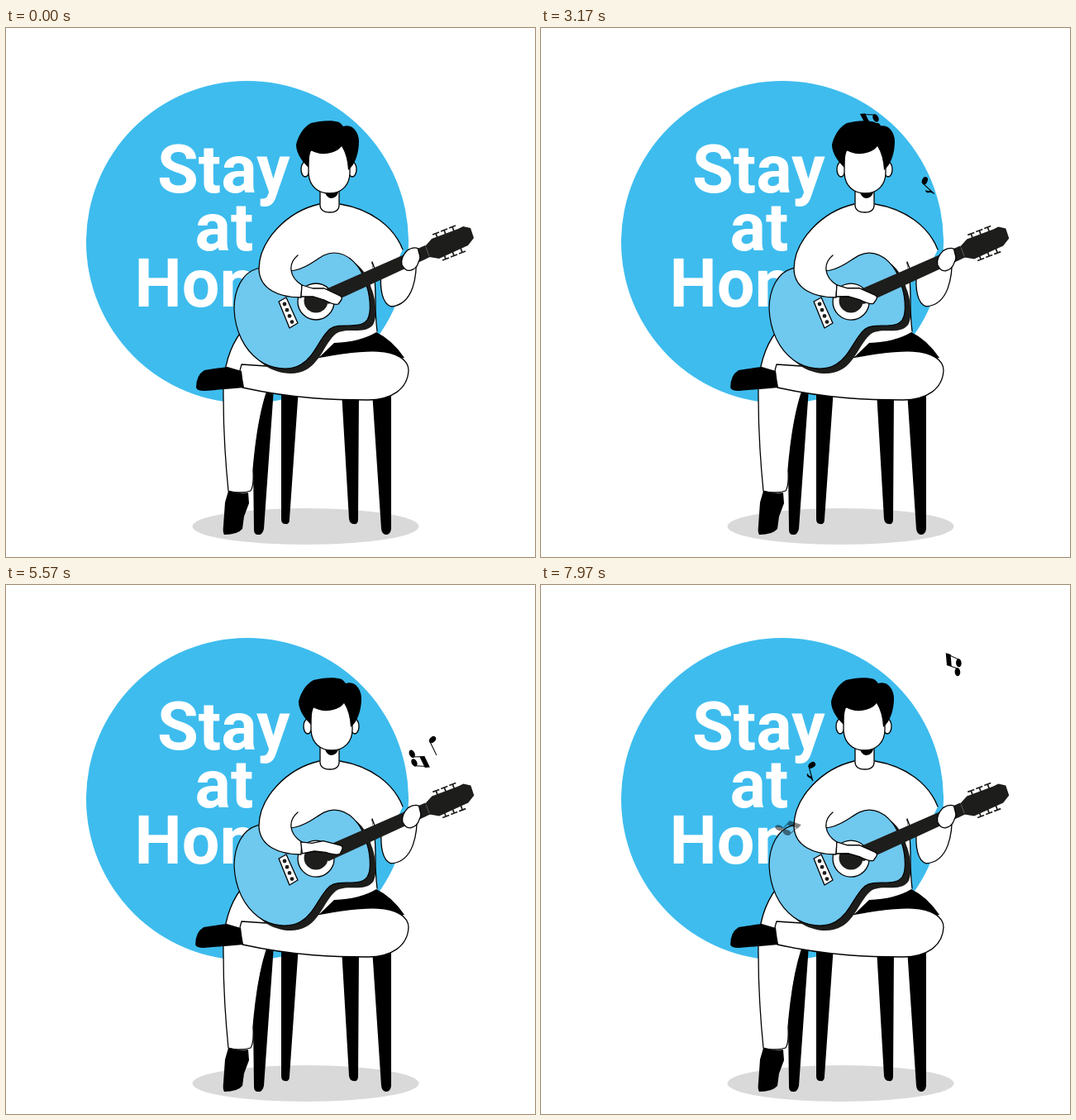
Write an HTML page that moves like this. It is 640 by 640 pixels and loops after 8000 ms.

```html
<!DOCTYPE html>
<html lang="en">
<head>
<meta charset="utf-8">
<title>Stay at Home</title>
<style>
  html, body { margin: 0; width: 100%; height: 100%; overflow: hidden; background: #fff; }
  svg { display: block; width: 100%; height: 100%; }
  text { font: 700 81px Roboto, sans-serif; fill: #fff; }
  .line { fill: #fff; stroke: #000; stroke-width: 1.3; stroke-linejoin: round; stroke-linecap: round; }
  .open { fill: none; }
  .cloth { fill: #fff; }
  .wood { fill: #1d1d1b; }
</style>
</head>
<body>
<svg viewBox="0 0 640 640">
  <defs>
    <path id="body" d="M304 291C286 296 276 316 276 340C277 366 288 389 306 402C320 412 342 416 357 407C374 397 379 375 392 364C405 355 427 366 437 353C443 344 440 320 435 309C430 288 414 272 397 272C380 272 372 288 350 293C335 297 318 287 304 291Z"/>
    <g id="pair">
      <ellipse cx="-8" cy="6" rx="5" ry="3.3" transform="rotate(-12 -8 6)"/>
      <ellipse cx="3" cy="6" rx="5" ry="3.3" transform="rotate(-12 3 6)"/>
      <path d="M-4 6L-1 -8M7 6L12 -10" stroke="#000"/>
      <path d="M-1 -8L13 -11L12 -5L-2 -2Z"/>
    </g>
    <g id="quarter">
      <ellipse cx="-2" cy="8" rx="4.7" ry="3.3" transform="rotate(-20 -2 8)"/>
      <path d="M2 8V-11" stroke="#000" stroke-width="1.1"/>
    </g>
    <g id="eighth">
      <use href="#quarter"/>
      <path d="M2 -11Q3 -7 6 -5Q8 -3 6 0Q5 -4 2 -5Z"/>
    </g>
  </defs>

  <ellipse cx="362.500" cy="603" rx="137" ry="22" fill="#d9d9d9"/>
  <circle cx="292" cy="259" r="195" fill="#3ebcee"/>
  <text x="183" y="198.500">Stay</text>
  <text x="228.500" y="268.500">at</text>
  <text x="155.500" y="336.500">Home</text>

  <path d="M310 436H324L312 606Q310 614 305 613Q300 613 300 607L299 530ZM333 436H354L343 594Q343 601 338 600Q333 600 333 594ZM406 440H427L426 594Q426 601 421 600Q416 600 415 594ZM443 440H466V606Q465 613 460 613Q455 613 454 606Z"/>
  <path class="line" d="M285 367C271 385 262 412 263 447C263 490 266 530 269 560Q283 564 296 560Q300 554 299 535C302 500 306 470 315 442L340 400Z"/>
  <path d="M269 560Q281 564 293 562L294 575L288 591L286 606Q280 613 264 613Q262 610 263 602L265 574Z"/>

  <path class="cloth" d="M379 213L404 213L440 240L443 284Q447 300 447 330L449 368L380 408L345 380L344 240Z"/>
  <path class="line open" d="M443 284Q447 300 447 330Q447 350 449 367"/>
  <path d="M370 407L397 381Q428 380 448 368Q467 377 482 399L430 410Z"/>
  <path class="line" d="M285 407L315 409C350 406 410 389 450 391C473 392 487 402 487 414C486 437 466 450 438 450C400 450 350 449 286 435Q280 420 285 407Z"/>
  <path id="foot" d="M288 435Q286 425 285 415L268 410Q252 412 240 414Q230 420 230 435Q231 439 240 439Q264 437 288 435Z"/>

  <path class="cloth" d="M404 213C441 219 469 240 480 268L465 300H445L443 283L392 260Z"/>
  <path class="line open" d="M404 213C441 219 469 240 480 268M443 283L446 291"/>
  <path id="forearm" class="line" d="M480 277L495 273C497 300 493 334 466 337C455 334 452 316 453 298L478 286"/>

  <g id="guitar">
    <use href="#body" x="7" y="6" class="wood"/>
    <use href="#body" fill="#6fc8ee" stroke="#000" stroke-width="1.2"/>
    <circle class="line" cx="375" cy="331" r="22"/>
    <circle class="wood" cx="375" cy="330" r="14.500"/>
    <path class="line" d="M330 331L339 326L353 357L343 363Z"/>
    <g class="wood" id="pins"></g>
    <path class="wood" d="M380 319L507 263L513 277L390 334Z"/>
    <path class="wood" d="M507 264L515 255L547 243L553 240L562 242L566 254L559 263L524 279L512 277Z"/>
    <path d="M508 265L512 276" stroke="#888" stroke-width=".6"/>
    <g id="pegs" stroke="#1d1d1b" stroke-width="1.800" fill="none"></g>
  </g>
  <path id="grip" class="line" d="M478 286Q476 278 484 269Q491 264 497 266L499 273Q501 277 498 283Q496 291 488 293Q482 294 478 286Z"/>

  <path class="cloth" d="M379 213C340 222 306 257 306 292C307 316 330 326 357 326L358 311C342 301 341 285 353 275L375 240L390 213Z"/>
  <path class="line open" d="M379 213C340 222 306 257 306 292C307 316 330 326 357 326L358 311C342 301 341 285 353 275"/>
  <path id="hand" class="line" d="M358 311L371 315L385 315L404 324Q408 326 405 330L402 334Q398 336 385 329L372 325L357 325Z"/>

  <path class="line" d="M380 194V212Q379 223 392 223Q404 223 403 212V194Z"/>
  <path d="M386 199H402Q400 206 393 206Q388 205 386 199Z"/>
  <g id="head">
    <ellipse class="line" cx="362" cy="171" rx="5" ry="9"/>
    <ellipse class="line" cx="419" cy="171" rx="5" ry="9"/>
    <path class="line" d="M366 150V176C367 192 378 200 391 200C406 200 416 190 416 175V145L391 135Z"/>
    <path d="M366 169C360 163 351 153 351 141C353 132 359 120 369 115C380 112 395 111 403 114Q406 116 408 119C419 115 427 126 427 137C427 150 423 165 414 172Q413 154 406 143C399 153 379 155 369 148Q366 157 366 169Z"/>
  </g>
  <g id="notes"></g>
</svg>
<script>
const LOOP = 8;
const $ = id => document.getElementById(id);
const add = (parent, name, attrs) => {
  const el = document.createElementNS('http://www.w3.org/2000/svg', name);
  for (const key in attrs) el.setAttribute(key, attrs[key]);
  return parent.appendChild(el);
};

for (let i = 0; i < 4; i++) add($('pins'), 'circle', { cx: 337 + 3 * i, cy: 334 + 7.2 * i, r: 2.4 });
for (let i = 0; i < 3; i++) {
  const x = 520 + 10 * i, y = 248.5 - 4 * i;
  add($('pegs'), 'path', { d: `M${x + 3} ${y + 8}L${x} ${y}m-4 1.500l8 -3` });
  add($('pegs'), 'path', { d: `M${x + 9} ${y + 23}l3 8m-4 1.500l8 -3` });
}

// x and y are the birth place; speeds are per second
const notes = [
  { shape: 'pair', born: 1.1, life: 3.2, x: 400, y: 246, vx: 0, vy: -64, angle: 14, spin: 116 },
  { shape: 'eighth', born: 1.72, life: 3.75, x: 470, y: 259, vx: -.8, vy: -46.5, angle: 11, spin: 84 },
  { shape: 'quarter', born: 3.5, life: 3.75, x: 523, y: 250, vx: -2.5, vy: -26.5, angle: -18, spin: 83 },
  { shape: 'pair', born: 4.55, life: 3.75, x: 499, y: 259, vx: 0, vy: -47.5, angle: -10, spin: 84 },
  { shape: 'eighth', born: 6.6, life: 3.2, x: 343, y: 307, vx: -11, vy: -59, angle: 32, spin: 97 },
  { shape: 'pair', born: 7.8, life: 3.2, x: 298, y: 303, vx: 0, vy: -60, angle: 12, spin: 110 }
];
for (const note of notes) note.el = add($('notes'), 'use', { href: '#' + note.shape });

const headSteps = [[0, 0], [1.93, 0], [3.17, 1], [4.67, 2], [5.57, 3], [6.73, 3.5], [7.97, 0], [8, 0]];
const clamp = v => Math.max(0, Math.min(1, v));
const wave = (t, period) => Math.sin(2 * Math.PI * t / period);
const swing = (t, period) => (1 - Math.cos(2 * Math.PI * t / period)) / 2;
const move = (id, value) => $(id).setAttribute('transform', value);

function track(steps, t) {
  const i = steps.findIndex(step => step[0] > t);
  const [t0, a] = steps[i - 1], [t1, b] = steps[i];
  return a + (b - a) * (t - t0) / (t1 - t0);
}

function draw(t) {
  const reach = `rotate(${1 + wave(t, .6)} 467 337)`;
  move('head', `translate(${track(headSteps, t)} 0)`);
  move('hand', `rotate(${-12 * swing(t, .32)} 357 318)`);
  move('foot', `translate(${-swing(t, .48)} 0)`);
  move('guitar', `rotate(${.15 * wave(t, .6)} 340 350)`);
  move('forearm', reach);
  move('grip', reach);
  for (const n of notes) {
    const age = t - n.born;
    n.el.setAttribute('opacity', Math.min(clamp(age / .35), clamp((n.life - age) / .3)));
    n.el.setAttribute('transform',
      `translate(${n.x + n.vx * age} ${n.y + n.vy * age}) rotate(${n.angle + n.spin * age})`);
  }
}

const start = performance.now();
function tick() {
  draw((performance.now() - start) / 1000 % LOOP);
  requestAnimationFrame(tick);
}
tick();
</script>
</body>
</html>
```
